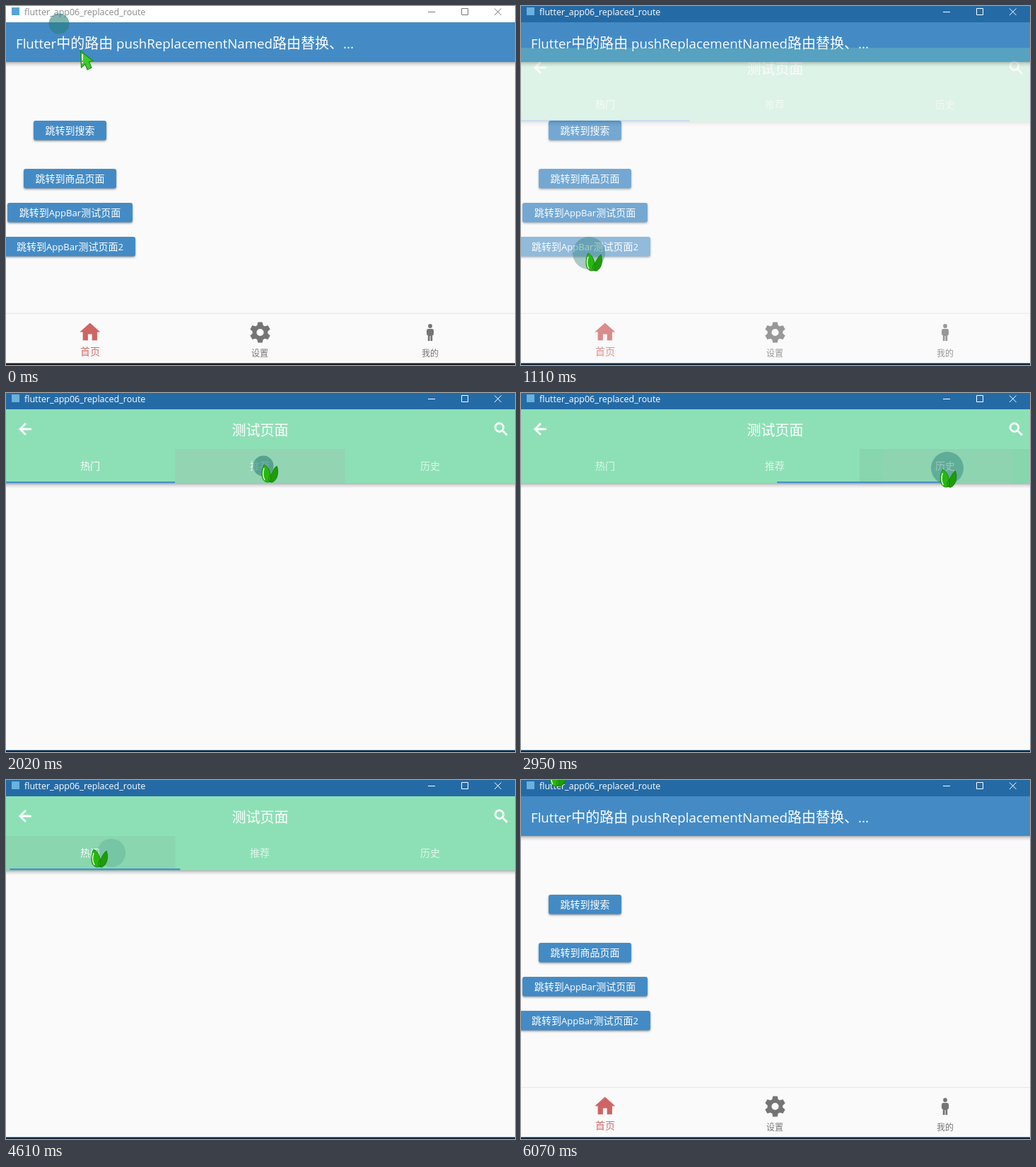
An HTML page with a canvas that plays this animation: 720 px wide and 507 px high, repeating every 6260 ms.

```html
<!DOCTYPE html>
<html lang="zh-CN">
<head>
<meta charset="utf-8">
<style>
html, body { margin: 0; width: 100%; height: 100%; overflow: hidden; background: #fafafa; }
canvas { display: block; }
</style>
</head>
<body>
<canvas id="stage" width="720" height="507"></canvas>
<script>
const W = 720, H = 507, TOP = 23, BOTTOM = 504, LOOP = 6260;
const BLUE = '#448bc5', GREEN = '#8de0b6', PAPER = '#fafafa';
const LATIN = '"Open Sans", "Noto Sans", sans-serif';
const HAN = '"Noto Sans CJK SC", "Noto Sans CJK", "Noto Sans CJK JP", sans-serif';

const screen = document.getElementById('stage').getContext('2d');
const layer = document.createElement('canvas');
layer.width = W;
layer.height = H;
const page = layer.getContext('2d');

const TICKS = [0, 160, 370, 560, 940, 1110, 1300, 1480, 1670, 1850, 2020, 2210, 2400, 2580, 2760,
  2950, 3140, 3330, 3520, 3700, 3890, 4080, 4250, 4440, 4610, 4800, 4980, 5160, 5350, 5540,
  5710, 5880, 6070];

// Pointer path: time, x, y
const PATH = [
  [-90, 72, 22], [0, 105, 63], [160, 100, 190], [370, 90, 325], [560, 91, 348], [1110, 91, 348],
  [1300, 110, 320], [1480, 230, 215], [1670, 345, 112], [1780, 361, 100], [2400, 361, 100],
  [2580, 480, 104], [2760, 592, 107], [3330, 593, 107], [3520, 540, 108], [3890, 300, 106],
  [4080, 210, 102], [4250, 146, 100], [4355, 146, 100], [4610, 120, 97], [4980, 75, 80],
  [5350, 43, 57], [5770, 43, 57], [5880, 42, 20], [5980, 40, -60], [6070, 40, -17]
];

const OPEN = 975, CLOSE = 5770;
// Clicks: press time, release time, place
const CLICKS = [
  { down: 900, up: OPEN, x: 96, y: 349 },
  { down: 1780, up: 2040, x: 364, y: 103, tab: 1 },
  { down: 2780, up: 2860, x: 603, y: 106, tab: 2 },
  { down: 4270, up: 4355, x: 149, y: 103, tab: 0 },
  { down: 5640, up: CLOSE, x: 46, y: 60 }
];
const TABS = [['热门', 119], ['推荐', 359], ['历史', 600]];
const BUTTONS = [
  ['跳转到搜索', 39, 162, 103], ['跳转到商品页面', 25, 230, 131],
  ['跳转到AppBar测试页面', 2, 278, 177], ['跳转到AppBar测试页面2', -2, 326, 185]
];

const BACK = new Path2D('M20 11H7.83l5.59-5.59L12 4l-8 8 8 8 1.41-1.41L7.83 13H20z');
const SEARCH = new Path2D('M15.5 14h-.79l-.28-.27A6.47 6.47 0 0 0 16 9.5 6.5 6.5 0 1 0 9.5 16c1.61 0 3.09-.59 4.23-1.57l.27.28v.79l5 4.99L20.49 19zm-6 0a4.5 4.5 0 1 1 0-9 4.5 4.5 0 0 1 0 9z');
const HOME = new Path2D('M10 20v-6h4v6h5v-8h3L12 3 2 12h3v8z');

const clamp = (v, a = 0, b = 1) => Math.min(b, Math.max(a, v));
const mix = (a, b, k) => a + (b - a) * k;

function bezier(x1, y1, x2, y2) {
  const at = (a, b, s) => 3 * a * s * (1 - s) ** 2 + 3 * b * s * s * (1 - s) + s ** 3;
  return x => {
    if (x <= 0 || x >= 1) return clamp(x);
    let lo = 0, hi = 1;
    for (let i = 0; i < 20; i++) {
      const m = (lo + hi) / 2;
      if (at(x1, x2, m) < x) lo = m; else hi = m;
    }
    return at(y1, y2, lo);
  };
}
const ease = bezier(.25, .1, .25, 1);
const easeIn = bezier(.42, 0, 1, 1);
const fastOut = bezier(.4, 0, .2, 1);

function pointer(t) {
  const i = PATH.findIndex(p => p[0] > t);
  if (i < 0) return PATH[PATH.length - 1].slice(1);
  if (i === 0) return PATH[0].slice(1);
  const a = PATH[i - 1], b = PATH[i], k = (t - a[0]) / (b[0] - a[0]);
  return [mix(a[1], b[1], k), mix(a[2], b[2], k)];
}

function tabPosition(t) {
  return CLICKS.reduce((pos, c) => c.tab === undefined ? pos : mix(pos, c.tab, ease((t - c.up) / 300)), 0);
}

function rect(g, color, x, y, w, h) {
  g.fillStyle = color;
  g.fillRect(x, y, w, h);
}

function disc(g, color, x, y, r) {
  g.fillStyle = color;
  g.beginPath();
  g.arc(x, y, r, 0, 7);
  g.fill();
}

function icon(g, shape, color, x, y, scale, line = 0) {
  g.save();
  g.translate(x, y);
  g.scale(scale, scale);
  g.fillStyle = g.strokeStyle = color;
  g.fill(shape);
  if (line) {
    g.lineWidth = line;
    g.stroke(shape);
  }
  g.restore();
}

// Mixed Chinese and Latin text, vertically centred on y.
function text(g, str, x, y, size, color, align = 'left') {
  const runs = str.match(/[\x00-\x7f]+|[^\x00-\x7f]+/g).map(s => {
    const font = /[\x00-\x7f]/.test(s) ? `${size * .935}px ${LATIN}` : `${size}px ${HAN}`;
    g.font = font;
    return { s, font, w: g.measureText(s).width };
  });
  if (align === 'center') x -= runs.reduce((sum, r) => sum + r.w, 0) / 2;
  g.fillStyle = color;
  for (const r of runs) {
    g.font = r.font;
    g.fillText(r.s, x, y + size * .375);
    x += r.w;
  }
}

function shadow(g, y) {
  const fade = g.createLinearGradient(0, y, 0, y + 7);
  fade.addColorStop(0, 'rgba(0,0,0,.3)');
  fade.addColorStop(.4, 'rgba(0,0,0,.12)');
  fade.addColorStop(1, 'rgba(0,0,0,0)');
  rect(g, fade, 0, y, W, 7);
}

function splash(g, t, c, rgb, alpha) {
  const a = alpha * (1 - clamp((t - c.up) / 300));
  if (t >= c.down && a > 0) disc(g, `rgba(${rgb},${a})`, c.x, c.y, (t - c.down) * .55);
}

function drawGear(g, x, y) {
  g.save();
  g.translate(x, y);
  g.fillStyle = '#757575';
  g.beginPath();
  for (let i = 0; i < 6; i++) {
    const a = i * Math.PI / 3;
    [[-4.4, 9], [-3.2, 14.5], [3.2, 14.5], [4.4, 9]].forEach(([u, v], j) => {
      const px = u * Math.cos(a) + v * Math.sin(a), py = u * Math.sin(a) - v * Math.cos(a);
      if (j) g.lineTo(px, py); else g.moveTo(px, py);
    });
    g.closePath();
  }
  g.fill();
  g.beginPath();
  g.arc(0, 0, 10.8, 0, 7);
  g.arc(0, 0, 5.1, 0, 7);
  g.fill('evenodd');
  g.restore();
}

function drawPerson(g, x, y) {
  disc(g, '#757575', x, y - 9, 2.9);
  g.beginPath();
  g.roundRect(x - 5, y - 5, 10, 9.5, 2.4);
  g.rect(x - 3.2, y + 2, 6.4, 10);
  g.fill();
  rect(g, PAPER, x - .5, y + 5, 1, 7);
}

function drawHome(g, t, mouse) {
  rect(g, PAPER, 0, TOP, W, BOTTOM - TOP);
  BUTTONS.forEach(([label, x, y, w], i) => {
    g.save();
    g.shadowColor = 'rgba(0,0,0,.38)';
    g.shadowBlur = 3;
    g.shadowOffsetY = 1.5;
    g.fillStyle = BLUE;
    g.beginPath();
    g.roundRect(x, y, w, 27.5, 3);
    g.fill();
    g.shadowColor = 'transparent';
    if (i === 3) {
      g.clip();
      if (mouse[1] > y && mouse[1] < y + 28 && t < OPEN + 300) rect(g, 'rgba(255,255,255,.06)', x, y, w, 28);
      splash(g, t, CLICKS[0], '255,255,255', .3);
    }
    g.restore();
    text(g, label, x + w / 2, y + 13.5, 14, '#fff', 'center');
  });
  rect(g, BLUE, 0, TOP, W, 56);
  shadow(g, 79);
  text(g, 'Flutter中的路由 pushReplacementNamed路由替换、...', 14, 52.5, 20, '#fff');

  rect(g, '#f3f3f3', 0, 433, W, 1);
  rect(g, '#ebebeb', 0, 434, W, 1);
  icon(g, HOME, '#cf6464', 101.4, 443.2, 1.45);
  drawGear(g, 359.5, 461);
  drawPerson(g, 600, 461);
  text(g, '首页', 119, 488, 14, '#d66b6b', 'center');
  text(g, '设置', 359, 490, 12, '#757575', 'center');
  text(g, '我的', 600, 490, 12, '#757575', 'center');
}

function drawTabs(g, t, mouse) {
  g.clearRect(0, 0, W, H);
  rect(g, PAPER, 0, TOP, W, H);
  rect(g, GREEN, 0, TOP, W, 104.5);
  shadow(g, 127.5);

  const pos = tabPosition(t);
  const hover = mouse[1] > 79 && mouse[1] < 127 && t > 1300 ? Math.floor(mouse[0] / 240) : -1;
  if (hover >= 0) rect(g, 'rgba(0,0,0,.045)', hover * 240 - 1, 79, 240.5, 48.5);
  for (const c of CLICKS) {
    if (c.tab === undefined) continue;
    g.save();
    g.beginPath();
    g.rect(c.tab * 240 - 1, 79, 240.5, 48.5);
    g.clip();
    splash(g, t, c, '200,200,200', .18);
    g.restore();
  }
  const back = CLICKS[4];
  if (t >= back.down) {
    g.save();
    g.beginPath();
    g.rect(0, TOP, W, 104.5);
    g.clip();
    disc(g, 'rgba(0,0,0,.055)', 27, 51, Math.min(35, (t - back.down) * .55));
    g.restore();
  }

  icon(g, BACK, '#fff', 14.2, 38.3, 1.06, .8);
  icon(g, SEARCH, '#fff', 687.8, 38.6, 1.06, .6);
  text(g, '测试页面', 359.5, 52, 20, '#fff', 'center');
  TABS.forEach(([label, x], i) =>
    text(g, label, x, 102.5, 14, `rgba(255,255,255,${Math.round(pos) === i ? 1 : .7})`, 'center'));
  rect(g, '#4690cb', pos * 240 - (pos > 0 ? 1 : 0), 125, pos > 0 ? 241 : 239, 2.3);
}

function drawWindow(g, active) {
  const ink = active ? '#fff' : '#777';
  rect(g, active ? '#246ba6' : '#fff', 0, 0, W, TOP);
  rect(g, active ? '#6cb0dd' : '#55a5d6', 8, 2, 11, 11);
  text(g, 'flutter_app06_replaced_route', 26, 8.2, 13.4, active ? '#fff' : '#8a8a8a');
  g.strokeStyle = ink;
  g.lineWidth = 1;
  g.beginPath();
  g.moveTo(597, 8.5);
  g.lineTo(607, 8.5);
  g.rect(644.5, 3.5, 9, 9);
  g.moveTo(691, 3.5);
  g.lineTo(700.5, 13);
  g.moveTo(700.5, 3.5);
  g.lineTo(691, 13);
  g.stroke();
  rect(g, active ? '#4f7ea6' : '#77757a', 0, BOTTOM, W, 1);
  rect(g, active ? '#10283e' : '#1d1b1f', 0, BOTTOM + 1, W, 2);
}

function drawRing(g, t) {
  const c = CLICKS.find(c => t >= c.up && t < c.up + 300);
  let [x, y] = pointer(t - 90).map(v => v + 3), r = 14.5, a = .58;
  if (c) {
    const age = t - c.up;
    ({ x, y } = c);
    r = 14 + 9 * clamp(age / 90) - Math.max(0, age - 135) * .025;
    a = .6 - age * .0016;
  }
  disc(g, `rgba(40,125,120,${a})`, x, y, r);
}

function drawArrow(g) {
  g.fillStyle = '#3fcb2e';
  g.strokeStyle = '#1c8d1a';
  g.lineWidth = 1.2;
  g.fill(ARROW);
  g.stroke(ARROW);
  rect(g, '#eaffdf', 2.2, 5, 1.8, 9);
  rect(g, '#eaffdf', 2.2, 16, 1.8, 2);
}
const ARROW = new Path2D('M.5.5L18 14.5 12.5 16 16 24 10 27 7 19 1.5 24z');

function drawLeaf(g) {
  const dark = new Path2D('M22 3C25 10 24 22 16 26 11 27 9 22 12 17 16 13 16 8 22 3z');
  const light = new Path2D('M4 1C10 4 15 13 13 25 7 28 1 24 1 15 1 9 2 5 4 1z');
  g.fillStyle = '#1f9c08';
  g.fill(dark);
  g.fillStyle = '#27b80c';
  g.fill(light);
  g.strokeStyle = '#12780a';
  g.lineWidth = .8;
  g.stroke(dark);
  g.stroke(light);
  g.strokeStyle = '#dfffd2';
  g.lineWidth = 1.5;
  g.stroke(new Path2D('M4 6C2 12 2 18 5 23'));
}

function drawCursor(g, t, [x, y]) {
  g.save();
  g.translate(x, y);
  if (t < 560 || (t >= 1300 && t < 1670)) drawArrow(g); else drawLeaf(g);
  g.restore();
}

function draw(t) {
  const g = screen, mouse = pointer(t);
  const shown = t < CLOSE ? clamp((t - OPEN) / 300) : 1 - clamp((t - CLOSE) / 300);
  drawHome(g, t, mouse);
  if (shown > 0) {
    drawTabs(page, t, mouse);
    g.save();
    g.beginPath();
    g.rect(0, TOP, W, BOTTOM - TOP);
    g.clip();
    g.globalAlpha = easeIn(shown);
    g.drawImage(layer, 0, Math.round((1 - fastOut(shown)) * (BOTTOM - TOP) / 4));
    g.restore();
  }
  drawWindow(g, t >= 940);
  drawRing(g, t);
  drawCursor(g, t, mouse);
}

let start;
function loop(now) {
  start ??= now;
  const t = (now - start) % LOOP;
  draw(TICKS.filter(k => k <= t).pop() ?? 0);
  requestAnimationFrame(loop);
}
requestAnimationFrame(loop);
</script>
</body>
</html>
```
